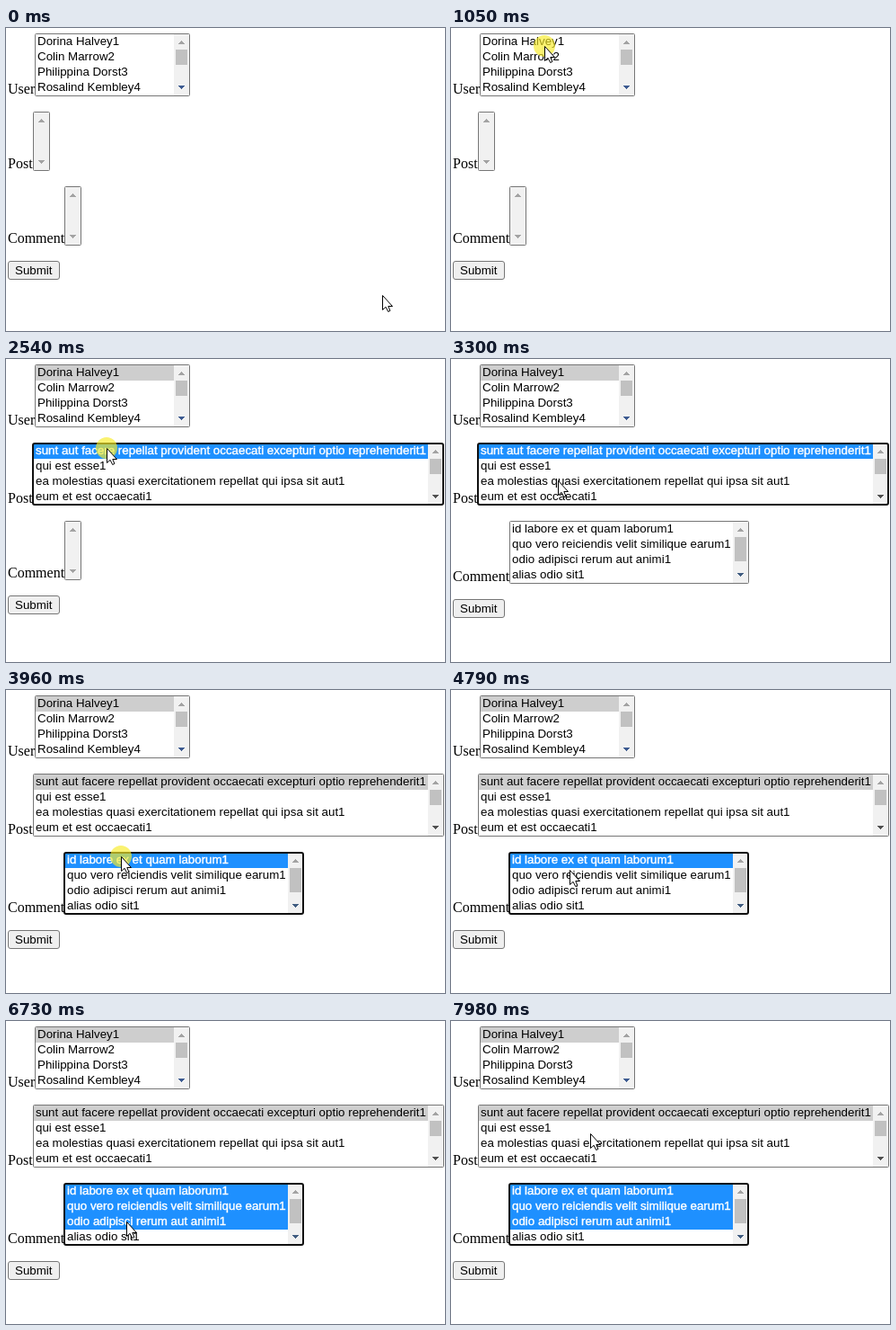
These frames come from a looping animation (489x337 px, 8000 ms). An HTML page with a canvas:

```html
<!DOCTYPE html>
<html lang="en">
<head>
<meta charset="utf-8">
<title>Linked list boxes</title>
<style>
  html, body { margin: 0; width: 489px; height: 337px; overflow: hidden; background: #fff; }
  canvas { display: block; }
</style>
</head>
<body>
<canvas id="stage" width="489" height="337"></canvas>
<script>
const ctx = document.getElementById('stage').getContext('2d');
const LOOP = 8000;
const ROW = 17;
const BAR = 17;
const PRESS = 130;
const FOCUS_DELAY = 20;
const SANS = '13.333px "Liberation Sans", Arial, sans-serif';
const SERIF = '16px "Liberation Serif", "Times New Roman", serif';

const users = ['Dorina Halvey1', 'Colin Marrow2', 'Philippina Dorst3', 'Rosalind Kembley4'];
const posts = [
  'sunt aut facere repellat provident occaecati excepturi optio reprehenderit1',
  'qui est esse1',
  'ea molestias quasi exercitationem repellat qui ipsa sit aut1',
  'eum et est occaecati1'
];
const comments = [
  'id labore ex et quam laborum1',
  'quo vero reiciendis velit similique earum1',
  'odio adipisci rerum aut animi1',
  'alias odio sit1'
];

// The pointer glides to each stop; bend bows the path sideways by a share of its length.
const origin = { x: 419, y: 297 };
const stops = [
  { x: 104, y: 20, start: 0, end: 750, bend: 0.18, click: 1050 },
  { x: 112, y: 99, start: 1680, end: 2340, bend: 0.13, click: 2540 },
  { x: 128, y: 185, start: 3010, end: 3660, bend: 0, click: 3960 },
  { x: 133, y: 204, start: 4480, end: 4910, bend: 0, click: 5260 },
  { x: 134, y: 223, start: 6150, end: 6530, bend: 0, click: 6570 },
  { x: 155, y: 125, start: 7090, end: 7980, bend: 0.5, click: Infinity }
];
const [userClick, postClick, ...commentClicks] = stops.map(stop => stop.click);
const postsLoaded = 1460;
const commentsLoaded = 2700;

const smooth = p => p * p * (3 - 2 * p);

function glide(from, to, time) {
  const s = smooth(Math.min(1, (time - to.start) / (to.end - to.start)));
  const dx = to.x - from.x;
  const dy = to.y - from.y;
  const bow = 2 * s * (1 - s) * to.bend;
  return {
    x: Math.round(from.x + dx * s - dy * bow),
    y: Math.round(from.y + dy * s + dx * bow)
  };
}

function pointerAt(time) {
  const next = stops.findLastIndex(stop => time >= stop.start);
  return glide(stops[next - 1] || origin, stops[next], time);
}

function fillBox(color, x, y, w, h) {
  ctx.fillStyle = color;
  ctx.fillRect(x, y, w, h);
}

// Strokes a rounded frame whose outer edge is the given box.
function frame(color, width, x, y, w, h, radius, fill) {
  ctx.beginPath();
  ctx.roundRect(x + width / 2, y + width / 2, w - width, h - width, radius);
  if (fill) {
    ctx.fillStyle = fill;
    ctx.fill();
  }
  ctx.strokeStyle = color;
  ctx.lineWidth = width;
  ctx.stroke();
}

function label(text, font, x, y, color = '#000') {
  ctx.font = font;
  ctx.fillStyle = color;
  ctx.fillText(text, x, y);
}

function arrow(x, y, dir, color) {
  for (let i = 0; i < 4; i++) {
    fillBox(color, x - i, dir < 0 ? y - 2 + i : y + 1 - i, 1 + 2 * i, 1);
  }
}

function scrollbar(x, y, h, thumb, downColor) {
  fillBox('#f1f1f1', x, y, BAR, h);
  if (thumb) fillBox('#c1c1c1', x + 2, y + BAR, 13, thumb);
  arrow(x + 8, y + 9, -1, '#a3a3a3');
  arrow(x + 8, y + h - 9, 1, thumb ? downColor : '#a3a3a3');
}

function option(text, x, y, w, selected, focused) {
  const lit = selected && focused;
  if (selected) fillBox(focused ? '#1e90ff' : '#cecece', x, y, w, ROW);
  label(text, SANS, x + 2, y + 12, lit ? '#fff' : '#000');
  if (lit) {
    ctx.strokeStyle = '#fff';
    ctx.lineWidth = 0.4;
    ctx.strokeText(text, x + 2, y + 12);
  }
}

// Draws a labelled list and returns the top of the next field.
function listBox({ name, x, y, w, items, selected, focused, thumb, downColor }) {
  const filled = items.length > 0;
  const width = filled ? w : BAR + 2;
  const h = filled ? 4 * ROW + 2 : 66;
  const barX = x + width - 1 - BAR;

  fillBox('#fff', x, y, width, h);
  items.forEach((text, i) =>
    option(text, x + 1, y + 1 + i * ROW, barX - x - 1, i < selected, focused));
  scrollbar(barX, y + 1, h - 2, filled && thumb, downColor);
  if (focused) frame('#101010', 2, x - 1, y, width + 1, h, 2);
  else frame('#767676', 1, x, y, width, h, 1);
  label(name, SERIF, 2, y + h - 3);
  return y + h + 17;
}

function button(y) {
  frame('#767676', 1, 2, y, 58, 21, 2.5, '#efefef');
  label('Submit', SANS, 10, y + 15);
}

function pointer({ x, y }, pressed) {
  if (pressed) {
    ctx.beginPath();
    ctx.arc(x, y, 12, 0, Math.PI * 2);
    ctx.fillStyle = 'rgba(248, 236, 40, 0.66)';
    ctx.fill();
  }
  const arrowShape = new Path2D('M0 0V16L3.6 12.8L6.2 18L8.4 17L6.3 12H11Z');
  ctx.save();
  ctx.translate(x + 0.5, y + 0.5);
  ctx.fillStyle = '#fff';
  ctx.fill(arrowShape);
  ctx.strokeStyle = '#000';
  ctx.lineWidth = 1;
  ctx.stroke(arrowShape);
  ctx.restore();
}

function draw(time) {
  const chosen = commentClicks.filter(click => time >= click).length;
  const userPicked = time >= userClick + FOCUS_DELAY;
  const postPicked = time >= postClick;

  fillBox('#fff', 0, 0, 489, 337);
  let y = listBox({
    name: 'User', x: 32, y: 6, w: 173, items: users, selected: Number(userPicked),
    focused: userPicked && !postPicked, thumb: 17, downColor: '#3c5a90'
  });
  y = listBox({
    name: 'Post', x: 30, y, w: 458, items: time >= postsLoaded ? posts : [],
    selected: Number(postPicked), focused: postPicked && !chosen, thumb: 17, downColor: '#505050'
  });
  y = listBox({
    name: 'Comment', x: 65, y, w: 267, items: time >= commentsLoaded ? comments : [],
    selected: chosen, focused: chosen > 0, thumb: 27, downColor: '#405c80'
  });
  button(y);
  pointer(pointerAt(time), stops.some(({ click }) => time >= click && time < click + PRESS));
}

const began = performance.now();
function tick() {
  draw(Math.max(0, performance.now() - began) % LOOP);
  requestAnimationFrame(tick);
}
tick();
</script>
</body>
</html>
```
